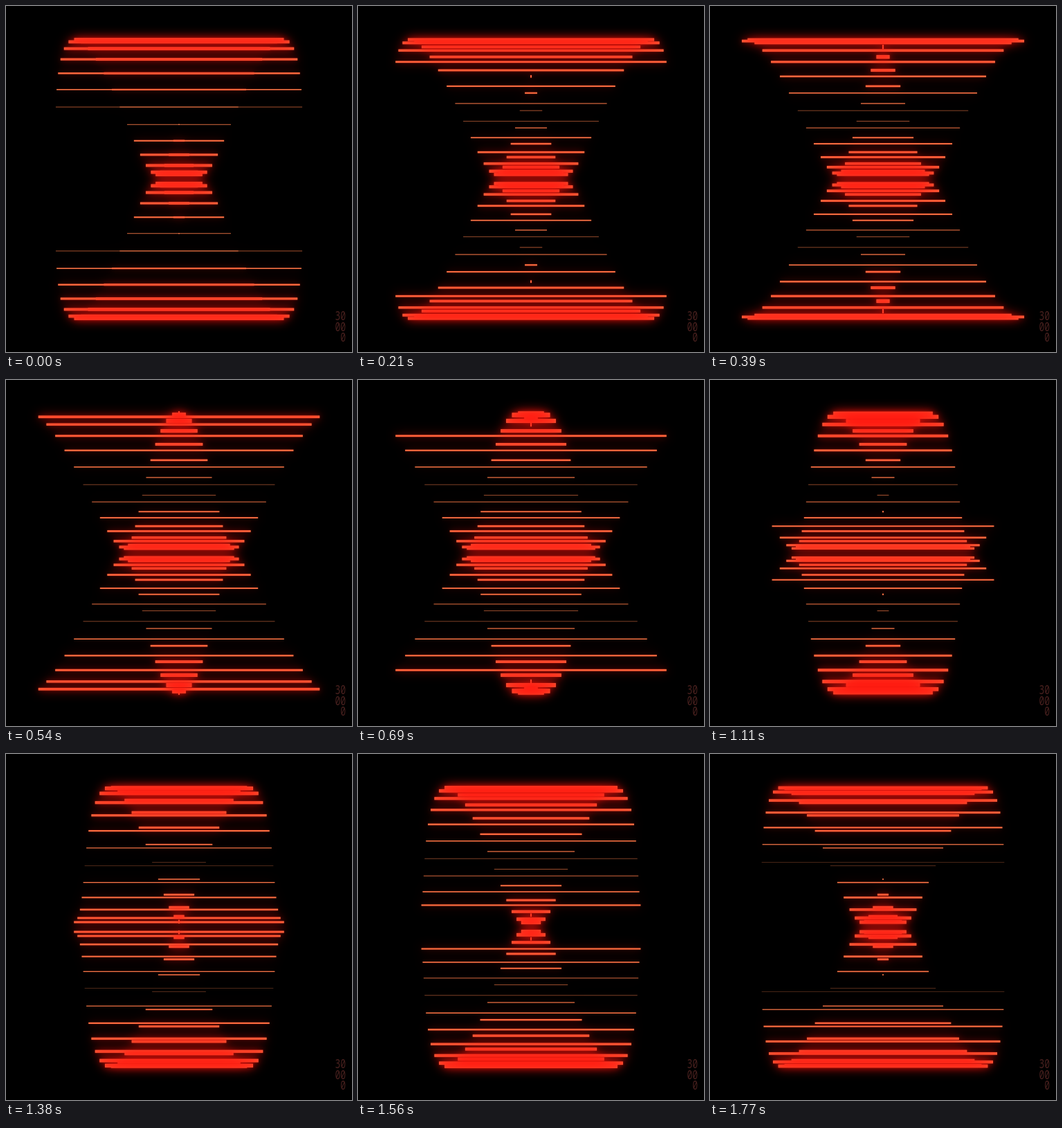
Recreate the animation shown at these times as an HTML page with a canvas. Size 500 px wide and 500 px high, loop 1800 ms.

```html
<!DOCTYPE html>
<html lang="en">
<head>
<meta charset="utf-8">
<title>Rotating bars</title>
<style>
  html, body { margin: 0; width: 100%; height: 100%; overflow: hidden; background: #000; }
  canvas { display: block; width: 500px; height: 500px; }
  .tag {
    position: absolute; left: 474.5px; top: 440px; width: 16px;
    font: 13px/11.6px "Noto Sans Mono", "DejaVu Sans Mono", monospace;
    text-align: right; color: #48201e;
    transform: scaleY(1.35); transform-origin: 0 0;
  }
</style>
</head>
<body>
<canvas id="stage" width="500" height="500"></canvas>
<div class="tag">30<br>00<br>0</div>
<script>
const SIZE = 500, MID = SIZE / 2;
const LOOP = 1800, STEP = 30;
const COUNT = 24;
const RING_Y = 146, RADIUS = 97.5;
const RAD = Math.PI / 180;

const ctx = document.getElementById('stage').getContext('2d');
const glow = document.createElement('canvas');
glow.width = glow.height = SIZE;
const glowCtx = glow.getContext('2d');

// Bar k sits on a turning ring; it widens with k and toward the outer edge.
function bar(k, time) {
  const c = Math.cos((105 + k * 360 / COUNT - time * 360 / LOOP) * RAD);
  return {
    y: RING_Y - RADIUS * c,
    half: 1 + k * (7.7 + 1.15 * c),
    height: 0.2 + Math.abs(c + 0.13) * (6 - 0.12 * k)
  };
}

function drawPair(target, { y, half, height }) {
  for (const cy of [y, SIZE - y]) {
    target.fillRect(MID - half, cy - height / 2, half * 2, height);
  }
}

function addGlow(radius, alpha) {
  ctx.filter = `blur(${radius}px)`;
  ctx.globalAlpha = alpha;
  ctx.drawImage(glow, 0, 0);
  ctx.filter = 'none';
  ctx.globalAlpha = 1;
}

function draw(time) {
  ctx.fillStyle = '#000';
  ctx.fillRect(0, 0, SIZE, SIZE);
  glowCtx.clearRect(0, 0, SIZE, SIZE);
  ctx.fillStyle = '#ff8852';
  glowCtx.fillStyle = '#ff120c';

  for (let k = COUNT - 1; k >= 0; k--) {
    const b = bar(k, time);
    drawPair(ctx, b);
    glowCtx.globalAlpha = Math.min(1, b.height / 4.5);
    drawPair(glowCtx, b);
  }
  addGlow(1.2, 0.5);
  addGlow(4, 0.4);
  addGlow(8, 0.85);
}

const start = performance.now();
function tick() {
  const time = (performance.now() - start) % LOOP;
  draw(Math.floor(time / STEP) * STEP);
  requestAnimationFrame(tick);
}
tick();
</script>
</body>
</html>
```
